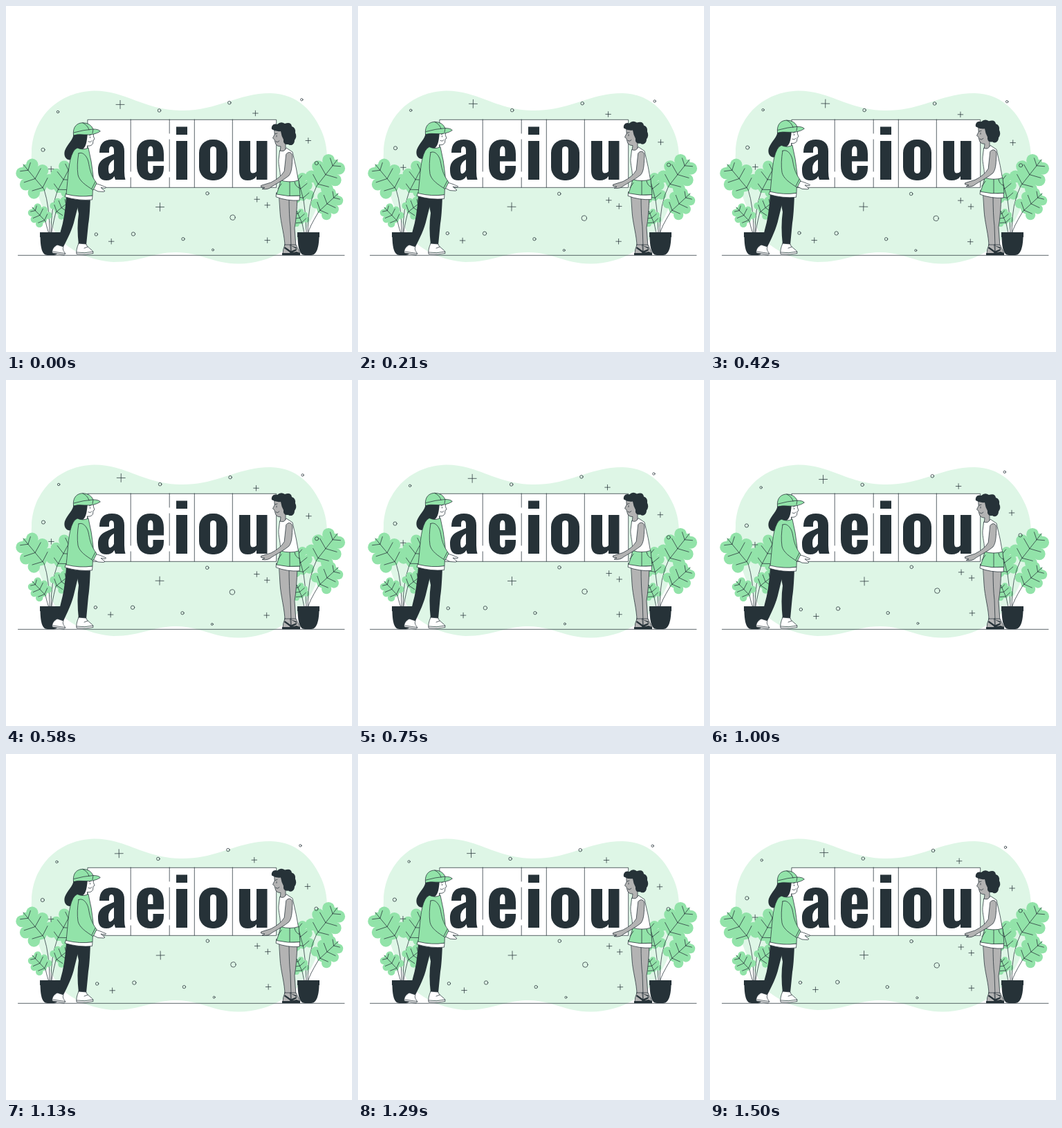
Write an HTML page that moves like this. It is 500 by 500 pixels and loops after 1.54 s.

```html
<!DOCTYPE html>
<html lang="en">
<head>
<meta charset="utf-8">
<title>Vowels</title>
<style>
  html, body { margin: 0; width: 100%; height: 100%; overflow: hidden; background: #fff; }
  svg { display: block; width: 100%; height: 100%; }
  .line { fill: none; }
  .line, .ink { stroke: #263238; stroke-width: .75; stroke-linecap: round; stroke-linejoin: round; }
  .dark { fill: #263238; }
  .green { fill: #92e3a9; }
  .white { fill: #fff; }
  .skin { fill: #b3b3b3; }
</style>
</head>
<body>
<svg viewBox="0 0 500 500">
  <path fill="#def6e6" d="M127 122.500C172 122 199 150 252 151S334 126 382 126C423 127 445 154 457 183C471 216 463 268 441 309C421 348 383 372 336 372.500C297 372 281 356 246 356S196 370 155 370C124 368 96 355 80 339C56 308 34 252 37 211C39 157 79 124 127 122.500Z"/>
  <path class="line" d="M17.500 360.300H489"/>

  <g id="leaves" class="green"></g>
  <g class="dark">
    <path id="pot" d="M49 327H81V334H80.500C80 349 77 360 69 360H60C52 360 50 349 49.500 334H49Z"/>
    <use href="#pot" x="372"/>
  </g>

  <g id="marks" class="line"></g>

  <path class="white ink" d="M118.300 164.300H390.700V262.300H118.300Z"/>
  <path class="line" d="M180.200 164V239M180.200 248V262M236.200 164V184M236.200 193V239M236.200 248V262M272.300 164V262M327.300 164V262"/>
  <g class="dark" fill-rule="evenodd">
    <path d="M135 212C135 199 141 193 153 193S171 199 171 210V239Q171 246 172.500 251H158L156.500 246Q153 252 145 252C136 252 133 246 133 237C133 223 141 220 156 214V209Q156 203 152.500 203T149 208V212ZM156 222Q148 226 148 235T151.500 242T156 237Z"/>
    <path d="M189 215C189 200 196 193 209 193S228 200 228 214V224.500H205V235Q205 242 209 242T212.500 236V231H228V234C228 246 221 252 209 252S189 245 189 230ZM205 217H212.500V209Q212.500 202.500 209 202.500T205 209Z"/>
    <path d="M246 174.500H262V186H246ZM246 195H262V251H246Z"/>
    <rect x="279" y="193" width="41" height="59" rx="19"/>
    <rect class="white" x="295" y="203" width="9" height="39" rx="4.500"/>
    <path d="M337 195H353V236Q353 241.500 356.500 241.500T362 239V195H377.500V251H362V246Q358 252 349 252C340 252 337 246 337 238Z"/>
  </g>

  <g id="girl">
    <g class="legs dark">
      <path d="M87 276Q85 306 79 325L74 345L83 348C89 336 96 323 99 309L107 278Z"/>
      <path d="M100 276H122Q121 304 119 315L116 345H105Q102 320 105 300Z"/>
    </g>
    <g class="white ink">
      <path d="M74 345L83 348C81 352 84 355 86 358L84 359.500L67 357C66 352 69 348 74 345ZM68 355L85 357.500"/>
      <path d="M105 343L116 344C117 350 126 351 126 357.500Q116 360 102 358.500Q101 352 105 343ZM102 356Q114 358 126 355M113 350L118 348"/>
    </g>
    <g class="body">
      <path class="dark" d="M98 184C97 194 89 199 85 209C83 216 86 222 92 222.500C99 222 101 213 104 208L118 207V184Z"/>
      <path class="white ink" d="M116 184H126.500L126.300 188L128 192.500L126 194L125.500 199Q123 203 117.500 202L118 208L110 207L114 198Z"/>
      <path class="dark" d="M106 184H118C117 191 117 201 112 206L103 209Z"/>
      <path class="line" d="M120 187L123 186M121.500 189V190.500M119 196Q122 198 124 195"/>
      <path class="green ink" d="M97.500 187C96 174 103 169 111 168.800Q122 169 126 178Q134 178 136.300 181Q128 187 113 186Q104 185 97.500 187Z"/>
      <path class="line" d="M98 183Q112 179 126 178L125 184M111 169Q118 172 120 179"/>
      <path class="white ink" d="M87 271Q106 276 125 274L124.500 280Q106 282 85.500 276Z"/>
      <path class="green ink" d="M103 205Q111 209 119 205Q124 225 126 246L125 274Q107 277 87 272C90 246 90 224 97 211Q99 207 103 205Z"/>
      <path class="white ink" d="M126 257C132 256 137 259 144.500 262L143.500 263.500L137 262.500L143 267.500L141 268.500L133 268L125 264Z"/>
      <path class="green ink" d="M105 213C111 210 117 217 119 225C121 235 122 244 131 256L126 266C115 259 106 253 104 244Q102 230 105 213ZM129 254L124 264"/>
    </g>
  </g>

  <g id="boy">
    <g class="legs skin ink">
      <path d="M407 276H421Q420 305 417 321L419 348H411L406 311Z"/>
      <path d="M395 276H409Q409 304 411 319L412 348H403C403 332 397 315 396 298Z"/>
    </g>
    <path class="skin ink" d="M411 345H419L425 357.500L422 359H413ZM403 345H412V354L410 358H400Q400 352 403 345Z"/>
    <path class="dark" d="M399 357H411L420 355L425 357V360H399ZM403 348L413 355V358L402 350ZM411 346L420 349V351ZM410 355L420 351V353L411 358Z"/>
    <g class="body">
      <path class="skin ink" d="M388 178H404V211H396L397 203Q390 203 389 197L388 193L385.500 191L388 186Z"/>
      <path class="dark" d="M384 178C383 173 387 169 392 171Q397 166 403 170Q412 167 413 174Q419 176 418 183Q421 189 417 194C417 200 412 203 408 200Q400 201 401 193Q398 188 397 181Q390 182 384 178Z"/>
      <path class="line" d="M388.500 185L392 184M391 187V189M390 196Q393 198 395 195"/>
      <path class="white ink" d="M396 209Q402 212 405 205L414 211Q420 235 423 255H396C398 241 393 230 394 222Z"/>
      <path class="white ink" d="M391 270Q407 276 424.500 274L424 281Q406 282 390.500 276Z"/>
      <path class="green ink" d="M397 252Q410 256 423 252L425 274Q407 276 391 272Q395 262 397 252ZM410 254V274M398 257L393 264M417 254Q418 261 424 263"/>
      <path class="skin ink" d="M405 214C409 209 414 212 414 218C413 228 414 238 409 245C402 251 392 256 384 261Q379 266 370 264.500L374 262.500L368.500 261.500V259.500L383 255Q397 248 402 239Z"/>
    </g>
  </g>
</svg>
<script>
const PERIOD = 1540;
const $ = selector => document.querySelector(selector);

const circle = (x, y, r) => `<circle cx="${x}" cy="${y}" r="${r}"/>`;
const cross = (x, y, r) => `<path d="M${x - r} ${y}h${2 * r}M${x} ${y - r}v${2 * r}"/>`;

// A leaf is a row of paired round lobes along a midrib, with a vein to each lobe.
function leaf(potX, baseX, baseY, tipX, tipY, width) {
  const dx = tipX - baseX, dy = tipY - baseY, length = Math.hypot(dx, dy);
  const at = (u, v) => [baseX + dx * u - dy / length * v * width, baseY + dy * u + dx / length * v * width];
  let lobes = '', veins = `M${potX} 327Q${potX} ${baseY + 25} ${baseX} ${baseY}L${tipX} ${tipY}`;
  for (const [u, v] of [[.12, .6], [.48, .65], [.82, .4]]) {
    for (const side of [-v, v]) {
      lobes += circle(...at(u, side), length * .12 + width * .13);
      veins += `M${at(u - .05, 0)}L${at(u + .08, side)}`;
    }
  }
  const body = `M${at(-.05, 0)}L${at(.12, .7)}L${at(.82, .45)}L${at(1, 0)}L${at(.82, -.45)}L${at(.12, -.7)}Z`;
  return `${lobes}<path d="${body}"/><path class="line" d="${veins}"/>`;
}
$('#leaves').innerHTML =
  leaf(65, 74, 268, 95, 228, 20) + leaf(66, 72, 298, 91, 283, 16) +
  leaf(63, 55, 265, 25, 229, 24) + leaf(63, 57, 311, 38, 291, 15) +
  leaf(434, 430, 280, 420, 243, 17) + leaf(433, 428, 314, 420, 296, 13) +
  leaf(436, 449, 260, 479, 222, 24) + leaf(437, 452, 297, 480, 271, 19);

$('#marks').innerHTML =
  circle(75, 153, 1.7) + circle(221.5, 151, 2.3) + circle(322.8, 139.8, 2.3) + circle(427.3, 135.3, 1.7) +
  circle(53.5, 207.8, 2.6) + circle(448.8, 227, 2.6) + circle(291, 270.8, 2.3) + circle(327.5, 305.6, 3.7) +
  circle(130.3, 330, 2.2) + circle(184, 329.5, 2.7) + circle(256, 336.7, 2.2) + circle(299, 352.4, 1.5) +
  cross(165, 142.4, 6) + cross(360.4, 155, 3.8) + cross(436.8, 194.5, 3.8) + cross(65.2, 235.6, 3.8) +
  cross(222.5, 290.5, 6) + cross(362.7, 279.3, 3.8) + cross(377.7, 287.8, 3.8) + cross(377.7, 338.6, 3.8) +
  cross(152.2, 340.2, 3.8);

// Raise the body while the legs stretch up from fixed ankles.
function lift(person, rise) {
  $(person + ' .body').setAttribute('transform', `translate(0 ${-rise})`);
  $(person + ' .legs').setAttribute('transform', `translate(0 346) scale(1 ${1 + rise / 68}) translate(0 -346)`);
}

function draw() {
  const now = performance.now();
  const wave = t => 2 * Math.PI * t / PERIOD;
  const rise = 2.75 * (1 + Math.cos(wave(now - 720)));
  lift('#girl', rise);
  lift('#boy', rise);
  $('#marks').setAttribute('transform', `rotate(${0.95 * Math.sin(wave(now))} 250 250)`);
  requestAnimationFrame(draw);
}
draw();
</script>
</body>
</html>
```
